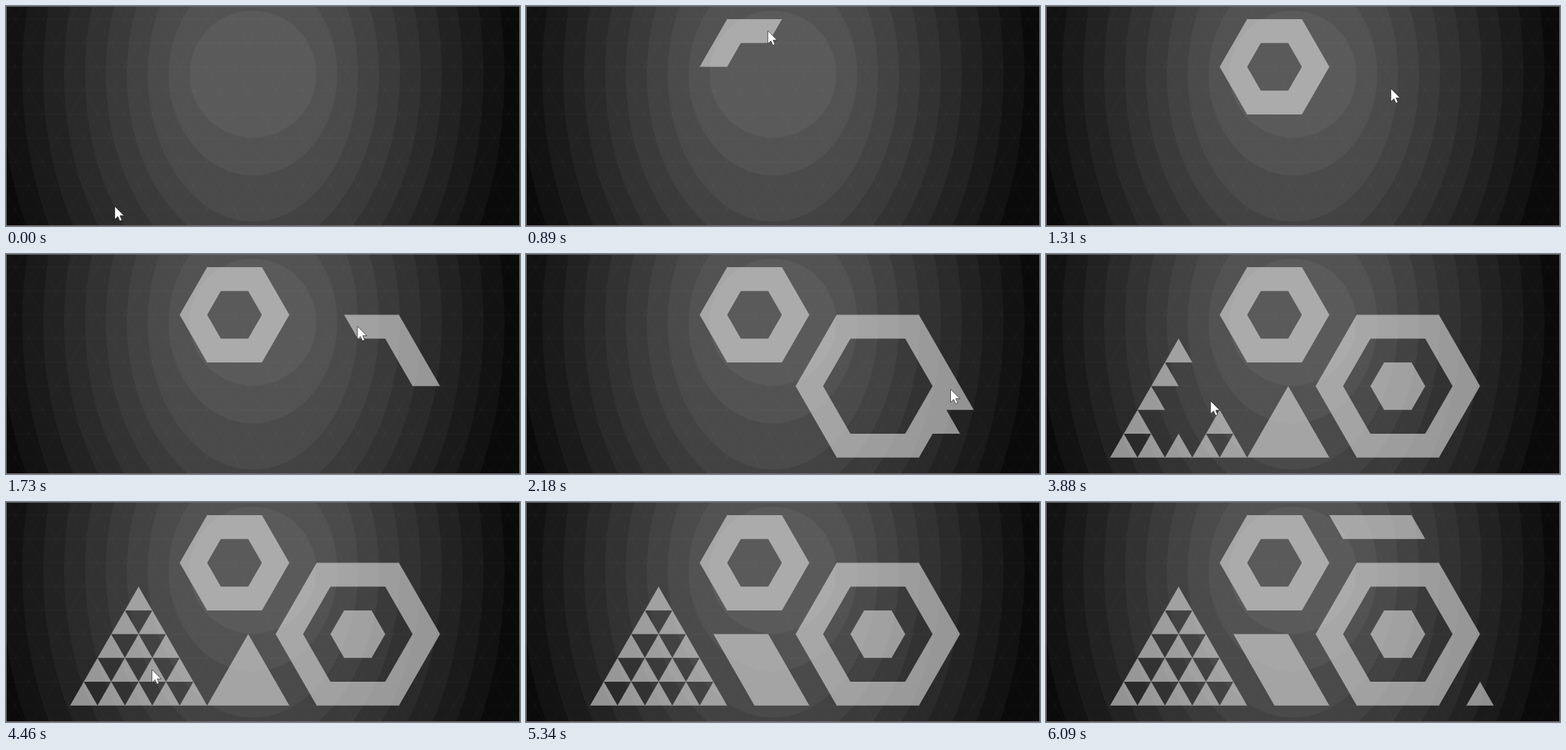
Recreate the animation shown at these times as an HTML page with a canvas. Size 664 by 284 pixels, loop 6190 ms.

```html
<!DOCTYPE html>
<html lang="en">
<head>
<meta charset="utf-8">
<title>Triangle drawing</title>
<style>
  html, body { margin: 0; width: 100%; height: 100%; overflow: hidden; background: #111; }
  canvas { display: block; }
</style>
</head>
<body>
<canvas id="stage" width="664" height="284"></canvas>
<script>
const W = 664, H = 284, LOOP = 6190, TICK = 145;
const ctx = document.getElementById('stage').getContext('2d');

// Triangular lattice: h counts half sides, r counts rows.
// A cell [r, j] spans h = j to j + 2; it points up when r + j is odd.
const px = h => 259.8 + 17.7 * h;
const py = r => 17 + 30.72 * r;
const key = cell => cell.join();
const range = (n, make) => Array.from({ length: n }, (_, i) => make(i));
const run = (r, j, n) => range(n, i => [r, j + i]);
const without = (list, cut) => {
  const gone = new Set(cut.map(key));
  return list.filter(c => !gone.has(key(c)));
};

function hexagon(h, r, size) {
  return range(size, i => {
    const j = h - size - i - 1, n = 2 * (size + i) + 1;
    return [...run(r - size + i, j, n), ...run(r + size - 1 - i, j, n)];
  }).flat();
}

// Ring cells, clockwise from the given angle.
function ring(h, r, size, start) {
  const turn = ([row, j]) => {
    const a = Math.atan2(py(row + .5) - py(r), px(j + 1) - px(h)) - start;
    return (a + 4 * Math.PI) % (2 * Math.PI);
  };
  return without(hexagon(h, r, size), hexagon(h, r, size - 1))
    .sort((a, b) => turn(a) - turn(b));
}

const slips = [[6, 15], [5, 16]];
const peak = range(3, i => run(5 + i, 2 - i, 2 * i + 1)).flat();
const peakEnd = [[6, 3], [7, 4]];
const pyramid = [
  ...range(5, i => [3 + i, -6 - i]),
  ...range(4, i => [7, -8 + 2 * i]),
  ...range(3, i => [6 - i, -3 - i]),
  [5, -6], [6, -7], [6, -5]
];
const slant = [...run(5, -1, 3).reverse(), [6, 0], [7, 0]];

// Each act toggles its cells from start to end, then rests the pointer.
const acts = [
  { start: 0, end: 0, cells: [], rest: [141, 259] },
  { start: 620, end: 1310, cells: ring(2, 2, 2, Math.PI), rest: [446, 107] },
  { start: 1730, end: 2180, cells: [...ring(11, 5, 3, 0).reverse(), ...slips], rest: [549, 175] },
  { start: 2330, end: 2720, cells: [...slips, ...hexagon(11, 5, 1)], rest: [330, 225] },
  { start: 2860, end: 2860, cells: without(peak, peakEnd), rest: [335, 250] },
  { start: 3010, end: 3880, cells: [...peakEnd, ...pyramid.slice(0, 10)], rest: [213, 190] },
  { start: 4030, end: 4910, cells: [...pyramid.slice(10), ...slant], rest: [277, 250] },
  { start: 5340, end: 5340, cells: [], rest: null },
  { start: 5490, end: 6090, cells: [...run(0, 6, 6), [7, 16]], rest: null }
];

// Cells shown and pointer place at time t.
function pose(t) {
  const on = new Map();
  let pointer = null;
  for (const { start, end, cells, rest } of acts) {
    if (t < start) break;
    const ticks = Math.round((end - start) / TICK);
    const tick = t >= end ? ticks : Math.floor((t - start) / (end - start) * ticks);
    const done = cells.slice(0, Math.ceil(cells.length * (tick + 1) / (ticks + 1)));
    for (const c of done) {
      if (!on.delete(key(c))) on.set(key(c), c);
    }
    if (tick === ticks) {
      pointer = rest;
    } else {
      const [r, j] = done[done.length - 1];
      pointer = [px(j + 1), py(r + .5)];
    }
  }
  return { on, pointer };
}

function drawBackdrop() {
  for (let n = 10; n >= 0; n--) {
    const grey = 90 - 8 * n, radius = 82 + 27 * n;
    ctx.fillStyle = `rgb(${grey},${grey},${grey})`;
    if (n === 10) ctx.fillRect(0, 0, W, H);
    ctx.beginPath();
    ctx.ellipse(319, 88, radius, radius * (1 + Math.min(n, 2) * .2), 0, 0, 2 * Math.PI);
    ctx.fill();
  }

  ctx.beginPath();
  for (let r = -1; r < 10; r++) {
    ctx.moveTo(0, py(r));
    ctx.lineTo(W, py(r));
  }
  for (let h = -31; h < 40; h += 2) {
    for (const lean of [-10, 10]) {
      ctx.moveTo(px(h), py(-1));
      ctx.lineTo(px(h + lean), py(9));
    }
  }
  ctx.strokeStyle = 'rgba(255,255,255,.025)';
  ctx.lineWidth = 1;
  ctx.stroke();
}

function drawCells(cells) {
  ctx.beginPath();
  for (const [r, j] of cells) {
    const up = (r + j) % 2 !== 0;
    const base = up ? r + 1 : r, tip = up ? r : r + 1;
    // Same winding for both kinds so shared edges stay seamless.
    ctx.moveTo(px(up ? j + 2 : j), py(base));
    ctx.lineTo(px(up ? j : j + 2), py(base));
    ctx.lineTo(px(j + 1), py(tip));
    ctx.closePath();
  }
  ctx.fillStyle = 'rgba(230,230,230,.58)';
  ctx.fill();
}

const arrow = new Path2D('M0 0V17L4 13.2L6.5 19L9.2 17.8L6.8 12.2H12Z');

function drawPointer([x, y]) {
  ctx.save();
  ctx.translate(x - .5, y - .5);
  ctx.fillStyle = '#fff';
  ctx.fill(arrow);
  ctx.strokeStyle = '#111';
  ctx.lineWidth = .6;
  ctx.stroke(arrow);
  ctx.restore();
}

function drawBorder() {
  ctx.strokeStyle = '#686868';
  ctx.lineWidth = 1;
  ctx.strokeRect(.5, .5, W - 1, H - 1);
  ctx.fillStyle = '#776c6c';
  ctx.fillRect(0, H - 1, W, 1);
}

function draw(t) {
  const { on, pointer } = pose(t);
  drawBackdrop();
  drawCells(on.values());
  drawBorder();
  if (pointer) drawPointer(pointer);
}

const begin = performance.now();
function frame() {
  draw((performance.now() - begin) % LOOP);
  requestAnimationFrame(frame);
}
frame();
</script>
</body>
</html>
```
